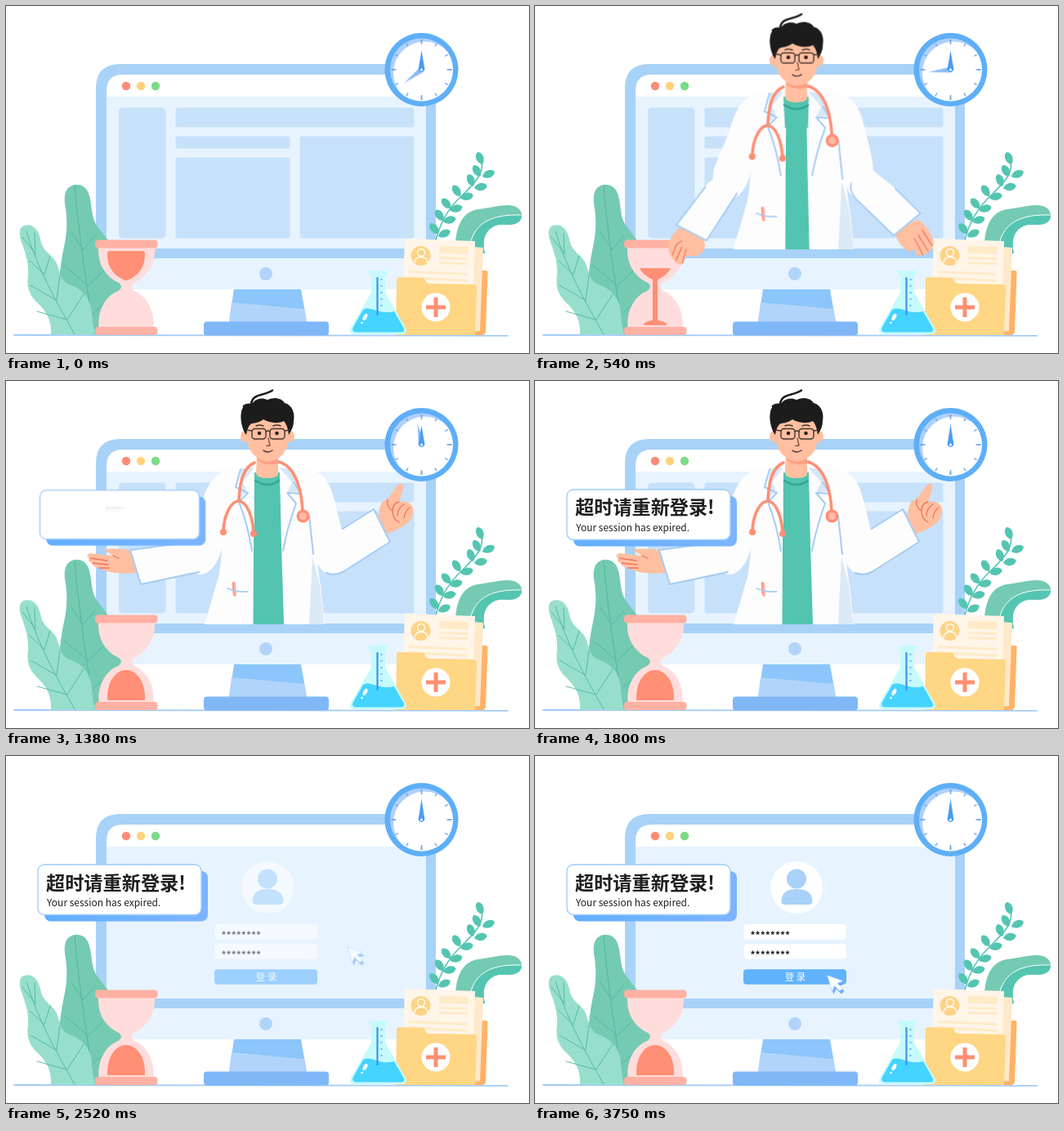
Recreate the animation shown at these times as an HTML page. Size 640 by 425 pixels, loop 4.5 s.

```html
<!DOCTYPE html>
<html lang="zh-CN">
<head>
<meta charset="utf-8">
<title>Session expired</title>
<style>
html, body { margin: 0; width: 100%; height: 100%; overflow: hidden; background: #fff; }
svg { display: block; width: 100%; height: 100%; }
text { font-family: "Noto Sans CJK SC", "Noto Sans CJK", "Noto Sans", sans-serif; }
.line { fill: none; stroke-linecap: round; stroke-linejoin: round; }
.seam { stroke: #a5ccf2; stroke-width: 2; }
.crease { stroke: #ee755c; stroke-width: 1.3; }
.vein { stroke: #4fb5a0; stroke-width: .9; }
.tube { stroke: #ff8f75; stroke-width: 3.6; }
.ink { stroke: #46352f; stroke-width: 1.4; }
.coat { fill: #fdfdfe; }
.skin { fill: #ffbfa0; }

/* One shared 4.5 s timeline */
.a { animation: 4500ms linear infinite; }

.minute { animation-name: minute; transform-origin: 508.5px 78px; }
@keyframes minute {
  0% { transform: rotate(232.5deg); animation-timing-function: cubic-bezier(.33, 0, .67, 1); }
  37.3%, 100% { transform: rotate(360deg); }
}
.level { animation-name: level; }
@keyframes level { 0% { transform: none; } 22.2%, 100% { transform: translateY(39px); } }
.stream { animation-name: stream; }
@keyframes stream {
  0% { transform: translateY(-62px); }
  4.5%, 22.2% { transform: none; }
  27.8%, 100% { transform: translateY(62px); }
}
.mound { animation-name: mound; transform-origin: 147px 391px; }
@keyframes mound {
  0%, 8.9% { transform: scale(0); }
  12% { transform: scale(.61, .16); }
  18% { transform: scale(.91, .43); }
  29%, 100% { transform: none; }
}
.leave { animation-name: leave; }
@keyframes leave { 0%, 43.3% { opacity: 1; } 54%, 100% { opacity: 0; } }
.pop { animation-name: pop; transform-origin: 320px 298px; }
@keyframes pop {
  0%, .4% { transform: scale(0); animation-timing-function: ease-out; }
  8.9% { transform: scale(1.021); animation-timing-function: ease-in-out; }
  12% { transform: scale(1.005); }
  14.2%, 100% { transform: none; }
}
.shirt { animation-name: shirt; transform-origin: 320px 298px; }
@keyframes shirt { 0%, 12% { transform: scaleX(.78); } 18%, 100% { transform: none; } }
.arm-l { animation-name: armL; transform-origin: 238px 218px; }
@keyframes armL {
  0%, 12% { transform: rotate(-45.3deg) scale(.94); animation-timing-function: cubic-bezier(.4, 0, .7, 1); }
  18% { transform: rotate(-4.4deg) scale(1); animation-timing-function: ease-out; }
  25%, 100% { transform: rotate(0deg) scale(1); }
}
.arm-r { animation-name: armR; transform-origin: 400px 222px; }
@keyframes armR {
  0%, 12% { transform: rotate(76.7deg) scale(.95); animation-timing-function: cubic-bezier(.4, 0, .7, 1); }
  18% { transform: rotate(6.3deg) scale(1); animation-timing-function: ease-out; }
  25%, 100% { transform: rotate(0deg) scale(1); }
}
.rest { animation-name: rest; animation-timing-function: step-end; }
@keyframes rest { 0% { opacity: 1; } 21%, 100% { opacity: 0; } }
.show { animation-name: show; animation-timing-function: step-end; }
@keyframes show { 0% { opacity: 0; } 21%, 100% { opacity: 1; } }
.bubble { animation-name: bubble; transform-origin: 139px 164px; }
@keyframes bubble {
  0%, 20.9% { transform: scale(0); }
  24% { transform: scale(.6); animation-timing-function: ease-out; }
  27.5% { transform: scale(1.06); animation-timing-function: ease-in-out; }
  30.67% { transform: scale(.975); animation-timing-function: ease-in-out; }
  33.5% { transform: scale(1.008); }
  36%, 100% { transform: none; }
}
.words { animation-name: words; transform-origin: 133px 156px; }
@keyframes words {
  0%, 29.5% { transform: scale(0); opacity: 0; }
  30.67% { transform: scale(.12); opacity: .12; animation-timing-function: ease-out; }
  35% { transform: scale(1.04); opacity: 1; animation-timing-function: ease-in-out; }
  38% { transform: scale(.99); }
  41%, 100% { transform: none; opacity: 1; }
}
.login { animation-name: login; }
@keyframes login { 0%, 52% { opacity: 0; } 59.3%, 100% { opacity: 1; } }
.cursor { animation-name: cursor; }
@keyframes cursor {
  0%, 60.4% { transform: translate(60px, -35px); animation-timing-function: cubic-bezier(.33, 0, .67, 1); }
  73.4%, 100% { transform: none; }
}
.press { animation-name: press; }
@keyframes press { 0%, 76% { fill: #61b3fc; } 79.8% { fill: #3f97ec; } 83.3%, 100% { fill: #61b3fc; } }
</style>
</head>
<body>
<svg viewBox="0 0 640 425">
<defs>
  <path id="leaf" d="M0 0C-7-4-6.500-14-1-16C6-13 5-4 0 0Z"/>
  <path id="arrow" d="M.5 .5L20 7.500L13 10.500L19.500 16.500L16 20L9.500 13.500L6.500 20.500Z"/>
  <linearGradient id="shade"><stop stop-color="#62afff"/><stop offset="1" stop-color="#7cb4ff"/></linearGradient>
  <clipPath id="screen"><path d="M123 297V104Q123 84 143 84H494Q514 84 514 104V297Z"/></clipPath>
  <clipPath id="dial"><circle cx="508.500" cy="78" r="38.500"/></clipPath>
  <clipPath id="bulb"><path d="M124 303Q124 300 127 300H167Q170 300 170 303C170 322 161 331 147 336.500C133 331 124 322 124 303Z"/></clipPath>
  <clipPath id="neck"><path d="M144 331H150V391H144Z"/></clipPath>
</defs>

<!-- monitor -->
<path fill="#e7f4ff" d="M110 300H526V325Q526 347 504 347H132Q110 347 110 325Z"/>
<path fill="#a8d2f7" d="M110 309V101Q110 71 140 71H496Q526 71 526 101V309Z"/>
<g clip-path="url(#screen)">
  <path fill="#fff" d="M123 84H514V111H123Z"/>
  <path fill="#e7f4ff" d="M123 111H514V297H123Z"/>
</g>
<circle cx="147" cy="98" r="5.200" fill="#ff8a78"/>
<circle cx="165" cy="98" r="5.200" fill="#ffd37c"/>
<circle cx="183" cy="98" r="5.200" fill="#7cdb88"/>
<circle cx="318" cy="328" r="8" fill="#b3d4fa"/>
<path fill="#8cc6fa" d="M279 347H361L368 387H273Z"/>
<path fill="#b1d4fa" d="M276 363L365 371L368 387H273Z"/>
<path class="line" stroke="#a3cbf6" stroke-width="1.800" d="M10 403L614 403.800"/>
<rect x="242" y="386.500" width="153" height="17" rx="4" fill="#80b7f7"/>

<g class="a leave" fill="#c8e1fb">
  <rect x="138" y="124.500" width="57.500" height="160" rx="5"/>
  <rect x="207.500" y="124.500" width="292" height="24" rx="3"/>
  <rect x="207.500" y="159.500" width="140" height="15" rx="3"/>
  <rect x="207.500" y="185.500" width="140" height="99" rx="3"/>
  <rect x="359.500" y="159.500" width="140" height="125" rx="3"/>
</g>

<!-- clock -->
<circle cx="508.500" cy="78" r="45" fill="#5eaff8"/>
<circle cx="508.500" cy="78" r="38.500" fill="#b0d0fb"/>
<circle cx="512.500" cy="82" r="38.500" fill="#fff" clip-path="url(#dial)"/>
<g fill="none" stroke="#78a9ee">
  <circle cx="508.500" cy="78" r="35" stroke-width="4" pathLength="12" stroke-dasharray=".08 .92" stroke-dashoffset=".04"/>
  <circle cx="508.500" cy="78" r="34" stroke-width="6" pathLength="4" stroke-dasharray=".034 .966" stroke-dashoffset=".017"/>
</g>
<path class="a minute" fill="#8bbcf8" d="M508.500 51L512 78Q508.500 83 505 78Z"/>
<path fill="#4b9df3" d="M508.500 54.500L512.500 78Q508.500 84 504.500 78Z"/>
<circle cx="508.500" cy="78" r="1.600" fill="#fff"/>

<!-- left plants -->
<path fill="#75cab2" d="M108 402.500C85 402 68 392 66 366C63 345 66 318 71 295C75 277 75 262 73 248C71 238 71 230 75 224C82 216 95 217 100 227C106 240 103 255 110 267C122 285 141 300 142 332C144 366 130 387 112 402Z"/>
<g class="line vein">
  <path d="M84 221C88 270 98 340 108 401"/>
  <path d="M94 298L80 277M95 298L109 281M100 342L71 318M101 342L132 313M105 378L74 352M105 378L139 348"/>
</g>
<path fill="#97dfcc" d="M55 402.500C56 386 50 375 40 365C28 354 25 344 27 330C28 315 24 304 20 292C15 280 16 271 22 269C31 266 39 272 42 285C44 301 56 303 62 315C67 328 67 337 77 341C93 346 104 358 105 376Q106 390 109 402.500Z"/>
<g class="line vein">
  <path d="M25 276C38 320 60 360 84 402"/>
  <path d="M35 302L20 283M36 304L35 278M46 328L29 312M47 329L54 306M61 360L30 342M62 360L66 330M74 384L38 374M75 384L95 353"/>
</g>

<!-- right plants -->
<path class="line" stroke="#54c5b1" stroke-width="1.600" d="M526 287C532 262 545 244 558 232C570 220 586 206 582 190"/>
<g fill="#54c5b1">
  <use href="#leaf" transform="translate(583 194)rotate(-18)"/>
  <use href="#leaf" transform="translate(580 209)rotate(-24)"/>
  <use href="#leaf" transform="translate(583 209)rotate(72)"/>
  <use href="#leaf" transform="translate(572 221)rotate(-18)"/>
  <use href="#leaf" transform="translate(573 223)rotate(84)"/>
  <use href="#leaf" transform="translate(556 233)rotate(-30)"/>
  <use href="#leaf" transform="translate(556 235)rotate(82)"/>
  <use href="#leaf" transform="translate(544 248)rotate(-36)"/>
  <use href="#leaf" transform="translate(543 250)rotate(80)"/>
  <use href="#leaf" transform="translate(535 263)rotate(-30)"/>
  <use href="#leaf" transform="translate(535 264)rotate(80)"/>
  <use href="#leaf" transform="translate(529 279)rotate(-34)"/>
  <use href="#leaf" transform="translate(529 282)rotate(70)"/>
</g>
<path fill="#74cab2" d="M550 292C551 268 560 251 578 249C596 247 612 241 624 246C632 250 633 258 628 264C618 272 606 264 595 271C584 278 583 290 586 303C572 305 555 302 550 292Z"/>
<path fill="#54c5b1" d="M568 292C574 263 598 255 631 256C631 260 630 262 628 264C618 272 606 264 595 271C584 278 583 290 586 303L568 300Z"/>
<path class="line" stroke="#fff" stroke-width="1" d="M568 292C574 263 598 255 630 256"/>

<!-- folder -->
<path fill="#ffb266" d="M581 324H587Q590 324 589.500 327L587 399Q586.500 403 582 403H572Z"/>
<path fill="#ffe9cb" d="M572 295L584 296L580 398L570 399Z"/>
<path fill="#fff5e9" d="M488 285L574 288L572 346L486 340Z"/>
<circle cx="507.500" cy="306" r="12" fill="#fdd487"/>
<g class="line" stroke="#fff" stroke-width="1.300"><circle cx="508" cy="302" r="4.500"/><path d="M500 314C500 305 516 305 516 314"/></g>
<g fill="#ffebc8">
  <path d="M530 294L566 295V304L530 303Z"/>
  <path d="M530 307L565 308V311L530 310ZM530 313L565 314V317L530 316Z"/>
  <path d="M493 324L565 327V330L493 327ZM493 331L565 335V338L493 334Z"/>
</g>
<path fill="#ffd684" d="M481 332L509 333Q512 333 513 336Q515 340 518 340L572 341Q576 341 576 345L574 403H477L478 335Q478 332 481 332Z"/>
<circle cx="526" cy="369" r="17.500" fill="#fff"/>
<path fill="#ff8f72" d="M523.500 357H528.500V366.500H538V371.500H528.500V381H523.500V371.500H514V366.500H523.500Z"/>

<!-- flask -->
<path fill="#c6fafc" d="M446 324H465Q467 324 467 327T464 330V351L489 394Q492 402 485 402H426Q419 402 422 394L447 351V330Q444 330 444 327T446 324Z"/>
<path fill="#45d4ff" d="M437 372C447 366 456 379 475 374L487 395Q488 399 484 399.500H428Q423 399 424.500 394Z"/>
<path class="line" stroke="#3f93e4" stroke-width="2.200" d="M454.500 333V378"/>
<path class="line" stroke="#5fa6ea" stroke-width="2.200" stroke-dasharray="0 8" d="M459.500 335V368"/>
<g fill="#fff"><ellipse cx="439.500" cy="381" rx="2.300" ry="4.500" transform="rotate(28 439.500 381)"/><circle cx="435.500" cy="388" r="1.300"/></g>

<!-- hourglass -->
<path fill="#ffdddc" d="M113 296H182C183 318 171 332 157 339C153 342 153 346 157 349C172 355 182 372 180.500 394H113.500C112 372 122 355 137 349C142 346 142 342 138 339C123 332 112 318 113 296Z"/>
<rect x="109" y="286.500" width="76.500" height="10" rx="4" fill="#ffb1a3"/>
<rect x="109" y="393" width="76.500" height="10" rx="4" fill="#ffb1a3"/>
<g fill="#ff8f75">
  <g clip-path="url(#bulb)"><rect class="a level" x="120" y="300" width="54" height="60"/></g>
  <g clip-path="url(#neck)"><rect class="a stream" x="143" y="331" width="8" height="61"/></g>
  <path class="a mound" d="M124 391C123 366 136 354 147 354S171 366 170 391Z"/>
</g>

<!-- doctor -->
<g class="a leave"><g class="a pop">
  <path class="coat" d="M305 104C288 105 272 109 262 117C266 150 266 215 260 240L243 298H390L385 250C378 215 378 150 374 108L334 103Z"/>
  <path fill="#dce9f6" d="M375 215L384 250L389.500 298H371Z"/>
  <path class="a shirt" fill="#53c4af" d="M304 112H335L337 200L340 298H302.500L303 200Z"/>
  <path fill="#53c4af" d="M304 112H335L334 150H306Z"/>
  <path class="skin" d="M307 88H333V112Q334 119 320 119T306 112Z"/>
  <path class="line" stroke="#36a792" stroke-width="2.500" d="M305 122Q320 132 334 122"/>
  <path fill="#ff9f85" d="M308 94Q320 103 333 94L333 101Q318 105 308 97Z"/>
  <path fill="#d8e7f8" d="M303 106L288 107L283 146L293 137Q297 118 303 106ZM335 106L351 108L362 135L345 137Z"/>
  <path class="coat" d="M303 107L290 124L296 136L285 145L301 208L304 180ZM335 107L350 124L344 137L355 147L339 208L337 170Z"/>
  <path class="line seam" d="M287 108L281 130L296 137L285 148Q296 176 301 208M352 124L361 138L344 137L355 150Q344 180 339 208"/>

  <!-- sleeves -->
  <path class="coat" d="M276 107C252 113 245 130 238 155L220 198C213 220 228 242 243 236C256 231 264 213 267 190Z"/>
  <path class="coat" d="M366 106C392 111 397 128 403 150L411 183C416 205 412 236 398 237C384 237 375 215 372 190Z"/>
  <path class="line seam" d="M371 165L376 212"/>
  <g class="a arm-l">
    <g class="a rest"><g transform="rotate(4.400 238 218)">
      <path class="skin" d="M156 220C143 217 129 222 122 232C117 242 118 258 125 257L136 252C140 262 152 264 158 261C164 258 166 252 166 246Z"/>
      <path class="line crease" d="M122 240L134 233L143 234M121 248L138 240M125 256L140 246"/>
    </g></g>
    <g class="a show">
      <path class="skin" d="M156 208C142 205 130 205 122 206C118 208 128 211 131 214L104 211C98 212 98 216 103 217C99 219 101 222 106 223C104 226 109 228 114 229C127 236 142 236 160 235Z"/>
      <path class="line crease" d="M103 217L124 220M106 223L125 225M114 229L126 229M131 214L138 217"/>
    </g>
    <path class="coat" d="M152 207L218 198L258 203C257 222 250 232 236 234L165 249Z"/>
    <path class="line seam" d="M213 199L152 207L165 249L236 234"/>
  </g>
  <g class="a arm-r">
    <g class="a rest"><g transform="rotate(-6.300 400 222)">
      <path class="skin" d="M463 169C474 161 489 157 499 160C507 164 510 173 508 182C506 188 501 186 498 185L499 192C492 200 482 203 468 202Z"/>
      <path class="line crease" d="M478 168L501 163M482 175L506 170M485 181L508 178"/>
    </g></g>
    <g class="a show">
      <path class="skin" d="M456 166C457 153 459 148 463 146L467 145L478 129C482 123 488 126 486 132L481 148C492 146 501 152 498 163C496 173 484 181 466 187Z"/>
      <path class="line crease" d="M467 145Q465 154 473 159M473 159Q473 150 481 148M479 165Q479 156 487 151M487 168Q488 159 494 155M473 159Q473 169 481 173"/>
    </g>
    <path class="coat" d="M450 157L409 183L381 205C380 225 386 238 403 237L412 234L470 197Z"/>
    <path class="line seam" d="M412 181L450 157L470 197L412 234Q402 239 392 235"/>
  </g>

  <!-- stethoscope and pocket -->
  <path class="line tube" d="M304 100C290 106 286 124 285 147M266 184C267 160 277 147 285 147C295 148 302 166 303 187M334 99C355 105 362 135 363 160"/>
  <g fill="#ff8f75"><circle cx="266" cy="185" r="4"/><circle cx="303" cy="187" r="4"/><circle cx="363.500" cy="165.500" r="8"/></g>
  <circle cx="363.500" cy="165.500" r="4.500" fill="#ffb9a9"/>
  <path class="line" stroke="#ffb0a3" stroke-width="4" d="M279 248L280 262"/>
  <path class="line" stroke="#ff8f75" stroke-width="1.600" d="M277.500 247L278.500 260"/>
  <path class="line" stroke="#a5ccf2" stroke-width="1.600" d="M271 254Q282 259 296 258"/>

  <!-- head -->
  <g class="skin"><ellipse cx="292" cy="68" rx="5" ry="7"/><ellipse cx="348" cy="68" rx="5" ry="7"/>
    <path d="M294 44H346V68C346 88 333 98 321 98S295 88 294 68Z"/></g>
  <path fill="#1d1c1c" d="M294 66C289 60 286 46 288 38C289 31 294 28 300 29C305 21 314 20 320 23C328 19 338 21 341 27C350 29 354 39 352 49C352 56 349 61 346 66C345 59 344 54 340 49C332 53 322 51 315 47C309 52 302 51 299 53Q295 58 294 66Z"/>
  <path class="line" stroke="#1d1c1c" stroke-width="2.600" d="M291 31Q295 27 301 30M300 28C302 15 314 19 326 11.500"/>
  <g class="line ink">
    <rect x="301" y="58.500" width="17" height="12.500" rx="3.500"/><rect x="323" y="58.500" width="18" height="12.500" rx="3.500"/>
    <path d="M318 62Q320.500 60 323 62M301 61L294 60M341 61L347 60"/>
    <path d="M306 55Q310 53 315 55M327 55Q332 53 336 55M315 85Q320 89 326 85"/>
  </g>
  <path class="line" stroke="#8a4a3a" stroke-width="1.300" d="M321 70L323 79L319 79.500"/>
  <g fill="#2a2020"><circle cx="310" cy="64" r="2.300"/><circle cx="331.500" cy="64" r="2.300"/></g>
</g></g>

<!-- login form -->
<g class="a login">
  <circle cx="320.300" cy="161" r="32" fill="#fff"/>
  <g fill="#a8d2f8"><circle cx="320" cy="150.500" r="12"/>
    <path d="M301.500 178C302 166 310 163 320 163S339 166 339.500 178Q339.500 182 335 182H306Q301.500 182 301.500 178Z"/></g>
  <rect x="255.500" y="206" width="125.500" height="18.500" rx="4" fill="#fff"/>
  <rect x="255.500" y="230" width="125.500" height="18.500" rx="4" fill="#fff"/>
  <g fill="#222" font-size="12" font-weight="700"><text x="263.500" y="223.500">********</text><text x="263.500" y="247.500">********</text></g>
  <rect class="a press" x="255" y="261.300" width="126" height="18.500" rx="4" fill="#61b3fc"/>
  <text x="318.500" y="275" text-anchor="middle" font-size="11.500" font-weight="500" fill="#fff">登 录</text>
  <g class="a cursor"><g transform="translate(357 268)">
    <use href="#arrow" x="2" y="3.500" fill="#69acf5"/>
    <use href="#arrow" fill="#fff" stroke="#a4caf5" stroke-width=".7"/>
  </g></g>
</g>

<!-- message -->
<g class="a bubble">
  <rect x="47" y="141" width="200" height="61.500" rx="8" fill="url(#shade)"/>
  <rect x="39" y="133" width="200" height="61.500" rx="8" fill="#fff" stroke="#9ccbfa" stroke-width="1.300"/>
</g>
<g class="a words" fill="#1f1f1f">
  <text x="49" y="163.500" font-size="23.200" font-weight="700">超时请重新登录!</text>
  <text x="50" y="184" font-size="12" font-weight="500">Your session has expired.</text>
</g>
</svg>
</body>
</html>
```
